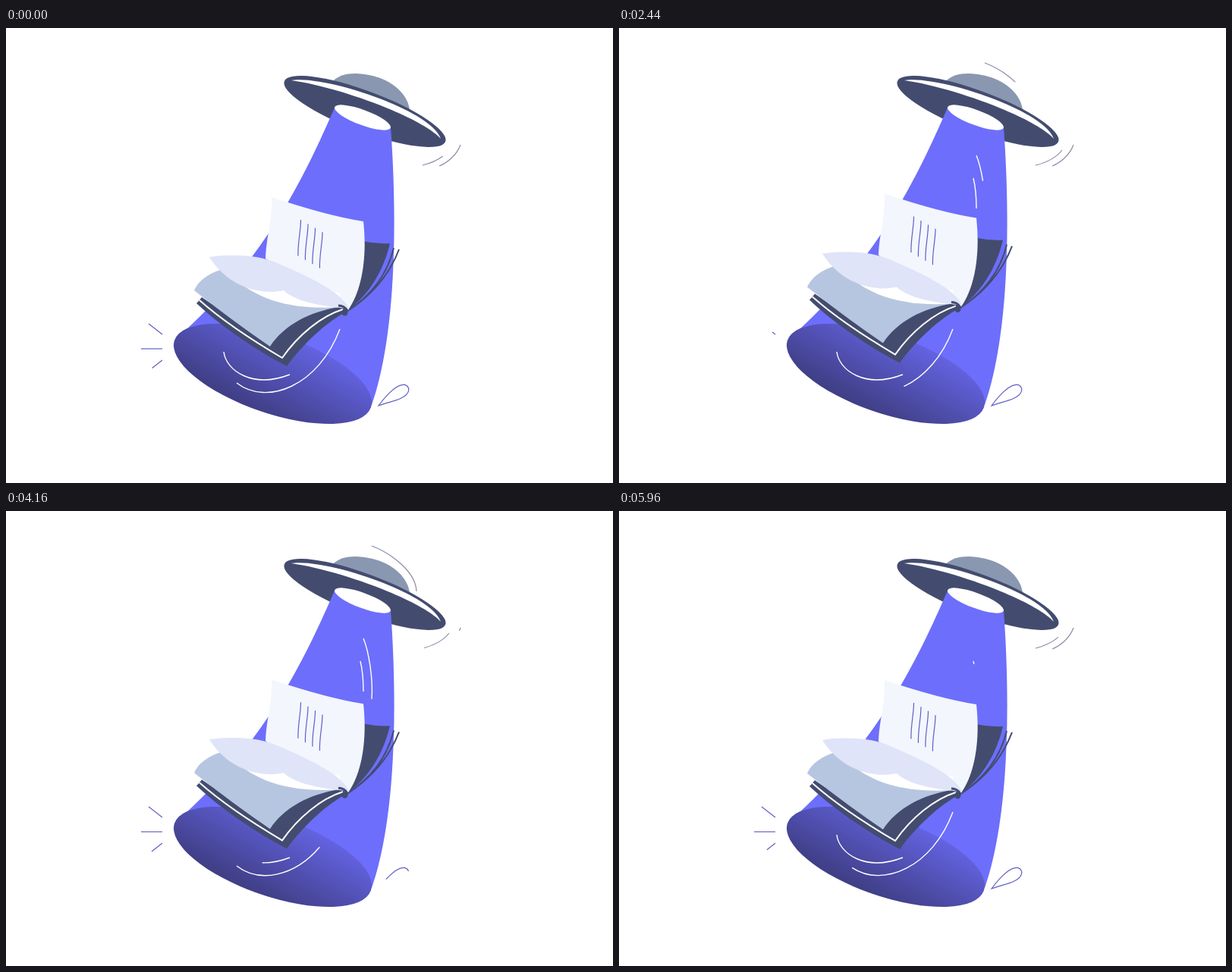
Write an HTML page that moves like this. It is 800 px wide and 600 px high and loops after 6000 ms.

```html
<!DOCTYPE html>
<html lang="en">
<head>
<meta charset="utf-8">
<title>Floating book</title>
<style>
  html, body { margin: 0; width: 100%; height: 100%; overflow: hidden; background: #fff; }
  svg { display: block; width: 100vw; height: 100vh; }
  .dark { fill: #434c6f; }
  .edge { fill: none; stroke: #434c6f; stroke-width: 2; }
  .trim, .text { fill: none; stroke-width: 1.2; }
  .text, .violet { stroke: #605ec6; }
  .white { stroke: #fff; stroke-width: 1.4; }
  .grey { stroke: #8b8ba9; }
</style>
</head>
<body>
<svg viewBox="0 0 800 600">
  <defs>
    <linearGradient id="shade" gradientUnits="userSpaceOnUse" x1="-9" y1="50" x2="9" y2="-56">
      <stop offset="0" stop-color="#403f87"/>
      <stop offset="1" stop-color="#6463e2"/>
    </linearGradient>
  </defs>

  <!-- saucer -->
  <path fill="#8997b0" d="M431 70C445 55 478 59 500 69C518 78 530 92 532 108L480 100Z"/>
  <ellipse class="dark" rx="113.3" ry="26.8" transform="translate(473 110) rotate(20.55)"/>
  <path fill="#fff" d="M376 69C420 62 560 108 573 146C548 118 440 78 376 69Z"/>

  <!-- beam -->
  <path fill="#6d6efb" d="M433 105C397 188 345 300 235 400L482 497C516 400 515 240 507 131Z"/>
  <ellipse fill="#fff" rx="39.3" ry="10" transform="translate(470 118) rotate(20.5)"/>
  <ellipse fill="url(#shade)" rx="136.8" ry="51.8" transform="translate(351.5 456) rotate(18.9)"/>

  <g id="book">
    <path class="dark" d="M470 281Q488 285 506 284C497 322 478 352 449 374Z"/>
    <path class="edge" d="M511 290C502 328 478 355 449 374M518 292C505 326 480 354 449 374"/>
    <path fill="#f3f6fd" d="M350 223Q425 248 471 255C476 300 470 345 451 372L342 304C343 275 351 255 350 223Z"/>
    <path class="dark" d="M258 355L346 415C362 390 398 368 440 365L449 374C423 387 392 416 370 446C330 425 285 395 251 363L254 360Z"/>
    <path d="M255 359C290 390 330 415 364 435C385 405 415 380 444 371" fill="none" stroke="#fff" stroke-width="2"/>
    <path fill="#b7c6e0" d="M248 346C255 330 272 322 286 318L400 350L439 368C400 374 366 392 348 420Q298 386 248 346Z"/>
    <path fill="#fff" d="M298 327C322 350 360 373 440 368L440 350Z"/>
    <path fill="#dfe4f8" d="M268 302C300 297 338 300 360 311C395 326 443 348 452 370C430 368 385 364 366 346C340 352 295 345 268 302Z"/>
    <path class="edge" d="M438 366Q446 366 450 373" style="stroke-width:3"/>
    <ellipse class="dark" cx="446.5" cy="375" rx="4" ry="4.5"/>
    <g id="text"></g>
  </g>
  <g id="lines"></g>
</svg>
<script>
  const LOOP = 6000, CYCLE = 3000, BOB = 2000, RISE = 10.8;

  // style, path, erase start, erase length, redraw start, redraw length (ms)
  const LINES = [
    ['grey', 'M482 46C508 56 540 80 541 106', 2080, 790, 3050, 705],
    ['grey', 'M549 181C565 177 577 170 584 161', 2888, 400, 3780, 400],
    ['grey', 'M571 182C581 178 594 168 599 154', 250, 400, 1120, 400],
    ['white', 'M471 168C478 185 484 220 482 248', 2135, 535, 3050, 535],
    ['white', 'M467 198C470 210 471 225 471 238', 2610, 390, 3530, 400],
    ['white', 'M287 427C290 452 325 476 374 457', 10, 740, 900, 740],
    ['white', 'M304 468C344 499 412 472 440 397', 780, 1260, 1700, 1290],
    ['violet', 'M530.5 475C528 468 520 470 514 474C504 481 497 490 491 498C502 494 512 492 519 489C528 485 532 481 530.5 475', 580, 910, 1490, 910],
    ['violet', 'M188 390L206 404', 1460, 280, 2380, 280],
    ['violet', 'M178 423H206', 1670, 300, 2600, 300],
    ['violet', 'M192 449L206 438', 1880, 230, 2780, 230]
  ];

  const byId = id => document.getElementById(id);
  const clamp = x => Math.min(1, Math.max(0, x));

  function addPath(parent, cls, d) {
    const path = document.createElementNS('http://www.w3.org/2000/svg', 'path');
    path.setAttribute('class', cls);
    path.setAttribute('d', d);
    parent.append(path);
    return path;
  }

  for (let i = 0; i < 4; i++) {
    addPath(byId('text'), 'text', `M${388.5 + 9.5 * i} ${253 + 5.4 * i}c.3 13 -4.3 31 -3.5 47.5`);
  }

  const trims = LINES.map(([cls, d, ...times]) => {
    const path = addPath(byId('lines'), 'trim ' + cls, d);
    path.setAttribute('pathLength', 100);
    return { path, times };
  });

  // Each line shrinks towards its start, then grows back from its end.
  function trim({ path, times: [out, outLen, back, backLen] }, t) {
    const u = (t - out + CYCLE) % CYCLE;
    const gone = clamp(u / outLen);
    const grown = clamp((u - back + out) / backLen);
    const dashes = [1 - gone, gone - grown, grown, 1].map(x => 100 * x);
    path.style.strokeDasharray = grown === 1 || gone === 0 ? 'none' : dashes.join(' ');
  }

  const start = performance.now();

  function draw(now) {
    const t = Math.max(0, now - start) % LOOP;
    const lift = RISE * (1 - Math.cos(2 * Math.PI * t / BOB)) / 2;
    byId('book').setAttribute('transform', `translate(0 ${-lift})`);
    trims.forEach(line => trim(line, t % CYCLE));
    requestAnimationFrame(draw);
  }
  draw(start);
</script>
</body>
</html>
```
